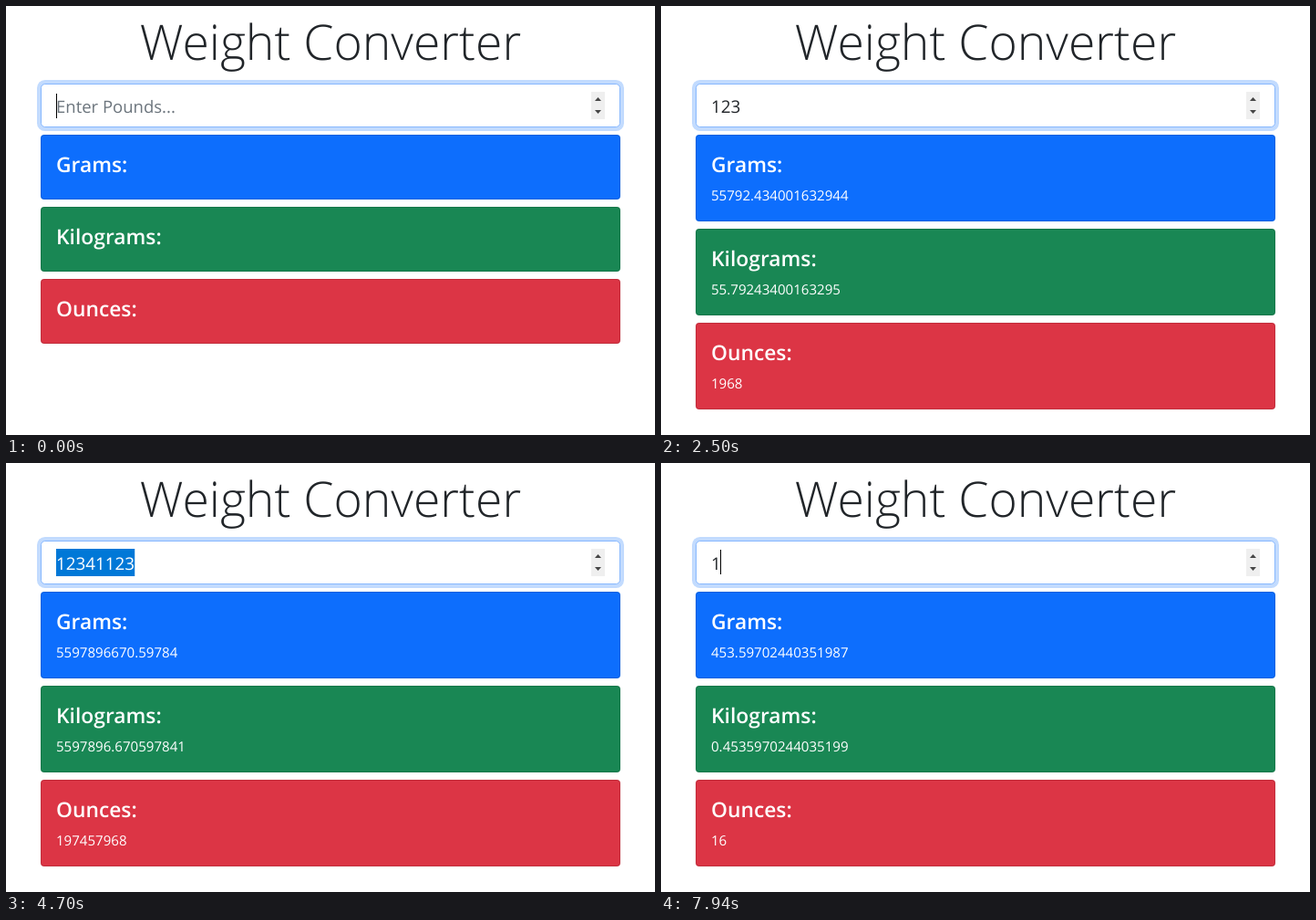
Animation, 712 px wide and 470 px high, one loop 8 s. Source, as an HTML page:

```html
<!DOCTYPE html>
<html lang="en">
<head>
<meta charset="utf-8">
<title>Weight Converter</title>
<style>
  html, body { margin: 0; width: 100%; height: 100%; overflow: hidden; background: #fff; }
  svg { display: block; width: 712px; height: 470px; }
  text {
    font-family: "Open Sans", "Noto Sans", sans-serif;
    text-rendering: geometricPrecision;
    white-space: pre;
  }
  .title { font-size: 53.5px; font-weight: 300; fill: #212529; text-anchor: middle; }
  .entry { font-size: 18.84px; fill: #212529; }
  .placeholder { font-size: 18.5px; fill: #6c757d; }
  .label { font-size: 22.8px; font-weight: 600; fill: #fff; }
  .value { font-size: 15.08px; fill: #fff; }
</style>
</head>
<body>
<svg id="stage" viewBox="0 0 712 470">
  <text class="title" x="356" y="59">Weight Converter</text>
  <rect x="34" y="81" width="644" height="56" rx="8.8" fill="#c2dbfe"/>
  <rect x="38.5" y="85.5" width="635" height="47" rx="4.3" fill="#fff" stroke="#86b7fe"/>
  <rect x="642" y="94" width="15" height="30" fill="#efefef"/>
  <path d="M646 104l3.5-4 3.5 4zM646 114l3.5 4 3.5-4z" fill="#444"/>
  <rect id="selection" x="55" y="94" height="30" fill="#0078d7"/>
  <text id="placeholder" class="placeholder" x="55" y="117">Enter Pounds...</text>
  <text id="entry" class="entry" x="55" y="117"></text>
  <rect id="caret" width="1" height="27" fill="#000"/>
</svg>
<script>
const LOOP = 8000;
const FIRST_INPUT = 1170;
const LEFT = 55;
const DIGIT_WIDTH = 10.78;

// start time, field text, caret state: 1 shown, 0 hidden, 's' text selected
const steps = [
  [0, '', 1], [410, '', 0], [940, '', 1],
  [FIRST_INPUT, '1', 1], [1640, '12', 1], [1970, '123', 1], [2500, '123', 0],
  [2730, '1234', 1], [2900, '12341', 1],
  [3450, '123411', 1], [3520, '1234112', 1], [3600, '12341123', 1],
  [4160, '12341123', 0], [4620, '12341123', 1], [4700, '12341123', 's'],
  [5400, '', 1], [5950, '', 0], [6430, '', 1],
  [6520, '0', 1], [7060, '0', 0], [7380, '', 0], [7610, '', 1],
  [7940, '1', 1]
];

const units = [
  ['Grams:', '#0d6efd', lb => lb / 0.0022046],
  ['Kilograms:', '#198754', lb => lb / 2.2046],
  ['Ounces:', '#dc3545', lb => lb * 16]
];

const byId = id => document.getElementById(id);
const stage = byId('stage');
const [selection, placeholder, entry, caret] =
  ['selection', 'placeholder', 'entry', 'caret'].map(byId);

function setAttrs(node, attrs) {
  for (const key in attrs) node.setAttribute(key, attrs[key]);
}

function add(parent, tag, attrs, content = '') {
  const node = document.createElementNS('http://www.w3.org/2000/svg', tag);
  setAttrs(node, attrs);
  node.textContent = content;
  return parent.appendChild(node);
}

function show(node, visible) {
  node.style.display = visible ? '' : 'none';
}

const cards = units.map(([label, color, convert]) => {
  const group = add(stage, 'g', {});
  const fill = add(group, 'rect', { x: 38, width: 636, rx: 4, fill: color });
  const border = add(group, 'rect', {
    x: 38.5, y: 0.5, width: 635, rx: 3.5, fill: 'none', stroke: '#000', 'stroke-opacity': 0.125
  });
  add(group, 'text', { class: 'label', x: LEFT, y: 41 }, label);
  const value = add(group, 'text', { class: 'value', x: LEFT, y: 72 });
  return { group, fill, border, value, convert };
});

function render(step) {
  const [start, text, mode] = step;
  const selected = mode === 's';
  const converted = start >= FIRST_INPUT;
  const textWidth = text.length * DIGIT_WIDTH;
  const height = converted ? 95 : 71;

  entry.textContent = text;
  entry.style.fill = selected ? '#fff' : '';
  show(placeholder, !text);
  show(selection, selected);
  setAttrs(selection, { width: textWidth });
  show(caret, mode === 1);
  setAttrs(caret, { x: Math.floor(LEFT + textWidth), y: text ? 95 : 96 });

  cards.forEach((card, i) => {
    setAttrs(card.group, { transform: `translate(0 ${141 + i * (height + 8)})` });
    setAttrs(card.fill, { height });
    setAttrs(card.border, { height: height - 1 });
    card.value.textContent = converted ? card.convert(Number(text)) : '';
  });
}

let current;
const origin = performance.now();

function tick() {
  const time = (performance.now() - origin) % LOOP;
  const step = steps.findLast(([start]) => start <= time);
  if (step !== current) render(current = step);
  requestAnimationFrame(tick);
}
tick();
</script>
</body>
</html>
```
